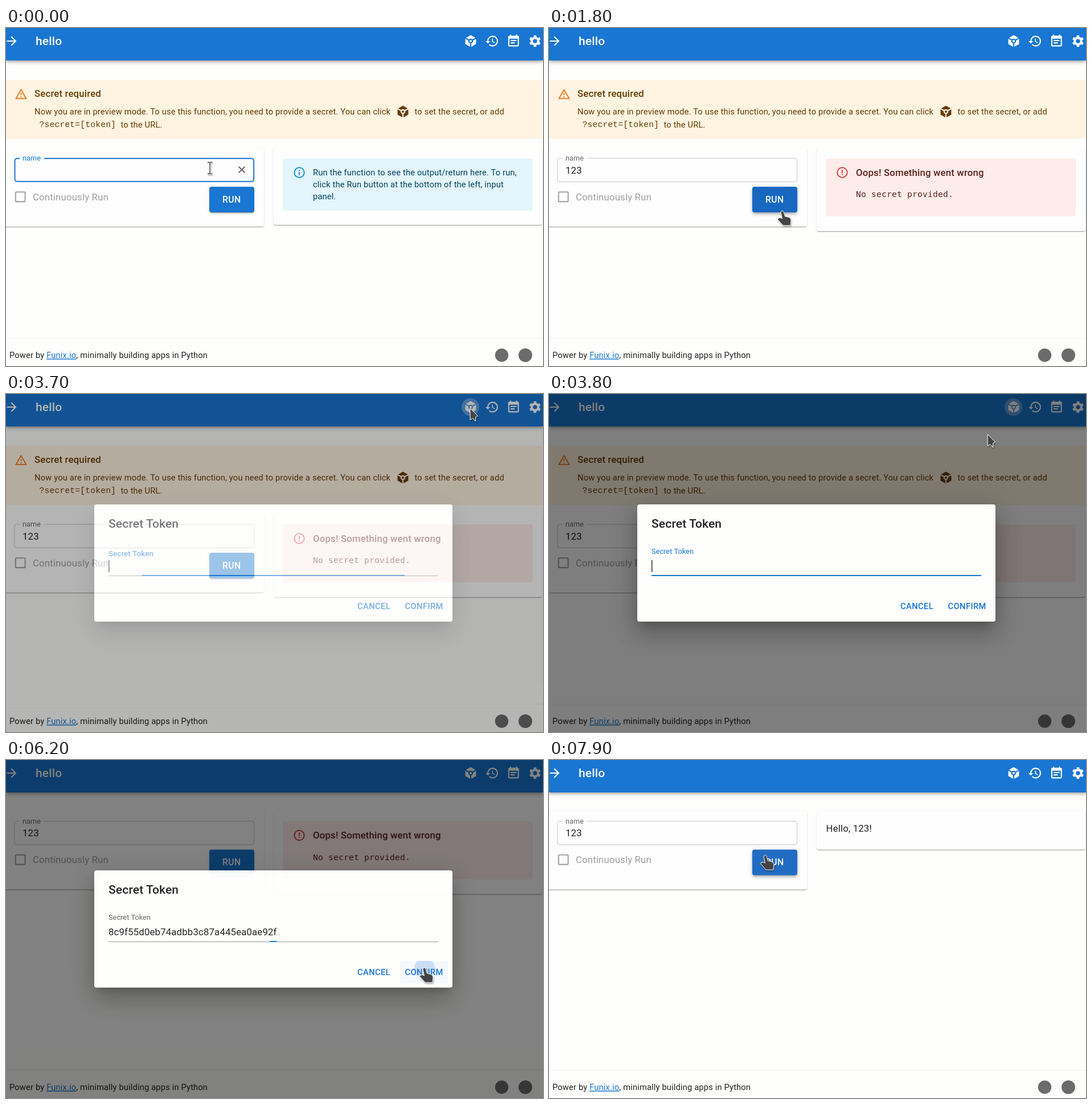
An HTML page that plays this animation: 943 by 594 pixels, repeating every 8000 ms.

```html
<!DOCTYPE html>
<html lang="en">
<head>
<meta charset="utf-8">
<title>hello</title>
<style>
  html, body { margin: 0; width: 100%; height: 100%; overflow: hidden; }
  #stage { position: relative; width: 943px; height: 594px; overflow: hidden; background: #fefefd; }
  #stage div, #stage svg { position: absolute; }
  .layer { left: 0; top: 0; width: 943px; height: 594px; overflow: visible; }
  .bar { left: 0; top: 0; width: 943px; height: 57px; background: #1976d2;
    box-shadow: 0 2px 4px -1px #0003, 0 4px 5px #00000024, 0 1px 10px #0000001f; }
  .alert { border-radius: 4px; }
  .card { top: 211px; background: #fefefe; border-radius: 4px;
    box-shadow: 0 2px 1px -1px #0003, 0 1px 1px #00000024, 0 1px 3px #0000001f; }
  #run { left: 357px; top: 279px; width: 79px; height: 44.5px; border-radius: 4px; overflow: hidden; }
  #confirm { left: 692px; top: 353px; width: 84px; height: 39px; border-radius: 4px; overflow: hidden; }
  .ripple { border-radius: 50%; }
  #dialog { left: 155px; top: 194px; width: 629px; height: 206px; background: #fefefd; border-radius: 4px;
    box-shadow: 0 11px 15px -7px #0003, 0 24px 38px 3px #00000024, 0 9px 46px 8px #0000001f; }
  text { font: 14.7px Roboto, sans-serif; letter-spacing: .0107em; fill: #212121; white-space: pre; }
  text.body { font-size: 16.8px; letter-spacing: .0094em; }
  text.title { font-size: 16.8px; font-weight: 500; letter-spacing: .0094em; }
  text.head { font-size: 21px; font-weight: 500; letter-spacing: .0075em; }
  text.label { font-size: 12.6px; letter-spacing: .0094em; }
  text.button { font-weight: 500; letter-spacing: .0286em; fill: #1976d2; }
  text.code { font-family: "Liberation Mono", monospace; }
  text.pre { font-family: "DejaVu Sans Mono", monospace; }
  .warn text { fill: #663c00; }
  .info text { fill: #014361; }
  .error text { fill: #5f2120; }
</style>
</head>
<body>
<div id="stage">
  <div id="warning" class="layer">
    <div class="alert" style="left:-4px;top:91px;width:946px;height:104px;background:#fff3e2"></div>
    <svg class="layer warn">
      <path transform="translate(14.9 104.6) scale(.963)" fill="#ed6c02" opacity=".9"
        d="M12 5.99L19.53 19H4.47L12 5.99M12 2L1 21h22L12 2zm1 14h-2v2h2v-2zm0-6h-2v4h2v-4z"/>
      <text class="title" x="50" y="121.3">Secret required</text>
      <text x="50" y="152">Now you are in preview mode. To use this function, you need to provide a secret. You can click</text>
      <use href="#cube" x="697" y="147" fill="#663c00"/>
      <text x="717.5" y="152">to set the secret, or add</text>
      <text class="code" x="58.5" y="173.5">?secret=[token]</text>
      <text x="201.5" y="175">to the URL.</text>
    </svg>
  </div>

  <div id="content" class="layer">
    <div class="card" style="left:-6px;width:459px;height:137.5px"></div>
    <div class="card" id="output" style="left:470px;width:472px"></div>
    <div class="alert" id="message" style="left:486px;top:229px;width:439px"></div>
    <div id="run"><div class="ripple" style="background:#fff"></div></div>
    <svg class="layer">
      <rect id="outline" rx="4" fill="none"/>
      <path d="M24 229h43" stroke="#fefefe" stroke-width="4"/>
      <text id="name" class="label" x="29" y="233">name</text>
      <text id="typed" class="body" x="29" y="255.8"></text>
      <path id="caret" stroke="#212121" stroke-width="1.2"/>
      <path id="clear" d="M408.5 243.5l11 11m0-11l-11 11" stroke="#666" stroke-width="1.8"/>
      <rect x="16.8" y="288.3" width="16.8" height="16.8" rx="1.2" fill="none" stroke="#a3a3a3" stroke-width="2.1"/>
      <text class="body" x="47" y="302.5" style="fill:#9e9e9e">Continuously Run</text>
      <text class="button" x="380" y="306.6" style="font-size:15.75px;fill:#fff">RUN</text>
      <g id="info" class="info">
        <g fill="none" stroke="#0288d1" stroke-width="2" opacity=".9">
          <circle cx="515" cy="254" r="8.7"/><path d="M515 249.2v2m0 1.8v5.8"/>
        </g>
        <text x="539" y="259">Run the function to see the output/return here. To run,</text>
        <text x="539" y="280">click the Run button at the bottom of the left, input</text>
        <text x="539" y="301">panel.</text>
      </g>
      <g id="error" class="error">
        <g fill="none" stroke="#d32f2f" stroke-width="2" opacity=".9">
          <circle cx="515" cy="254" r="8.7"/><path d="M515 249.2v5.8m0 1.8v2"/>
        </g>
        <text class="title" x="539" y="259.8">Oops! Something went wrong</text>
        <text class="pre" x="539" y="297">No secret provided.</text>
      </g>
      <text id="hello" class="body" x="486.5" y="247">Hello, 123!</text>
    </svg>
  </div>

  <div class="bar"></div>
  <svg class="layer">
    <defs>
      <g id="cube"><path transform="scale(1.05) translate(-12 -12)"
        d="M9.1 9.24C9.83 8.48 10.86 8 12 8s2.17.48 2.9 1.24l5.04-2.8L12 2 4.06 6.44zM11 15.87c-1.73-.44-3-2.01-3-3.87 0-.35.04-.69.13-1.01L3 8.14V17l8 4.44zm2 0v5.57L21 17V8.14l-5.13 2.85c.09.32.13.66.13 1.01 0 1.86-1.27 3.43-3 3.87zM10 12a2 2 0 1 0 4 0 2 2 0 1 0-4 0z"/></g>
    </defs>
    <text class="head" x="52" y="30" style="fill:#fff">hello</text>
    <circle id="glow" cx="815.5" cy="23" r="15.5" fill="#fff" opacity=".3"/>
    <g fill="#fff">
      <path transform="translate(-2.6 10.4) scale(1.05)" d="M12 4l-1.41 1.41L16.17 11H4v2h12.17l-5.58 5.59L12 20l8-8z"/>
      <use href="#cube" x="816" y="23"/>
      <path transform="translate(840.9 10.4) scale(1.05)" d="M13 3c-4.97 0-9 4.03-9 9H1l3.89 3.89.07.14L9 12H6c0-3.87 3.13-7 7-7s7 3.13 7 7-3.13 7-7 7c-1.93 0-3.68-.79-4.94-2.06l-1.42 1.42C8.27 19.99 10.51 21 13 21c4.97 0 9-4.03 9-9s-4.03-9-9-9zm-1 5v5l4.28 2.54.72-1.21-3.5-2.08V8H12z"/>
      <path transform="translate(878.7 10.4) scale(1.05)" d="M17 10H7v2h10v-2zm2-7h-1V1h-2v2H8V1H6v2H5c-1.11 0-1.99.9-1.99 2L3 19c0 1.1.89 2 2 2h14c1.1 0 2-.9 2-2V5c0-1.1-.9-2-2-2zm0 16H5V8h14v11zm-5-5H7v2h7v-2z"/>
    </g>
    <g transform="translate(929 23) rotate(75.5) scale(1.05)" fill="none" stroke="#fff">
      <circle r="5.5" stroke-width="3.9"/>
      <circle r="8.2" stroke-width="3" pathLength="12" stroke-dasharray="1 1"/>
    </g>
    <path d="M0 545h943" stroke="#f0f0f0"/>
    <text x="6" y="580">Power by <tspan fill="#1976d2" text-decoration="underline">Funix.io</tspan>, minimally building apps in Python</text>
    <g fill="#6b6b6b"><circle cx="870.5" cy="575" r="11.7"/><circle cx="912" cy="575" r="12"/></g>
  </svg>

  <div id="modal" class="layer">
    <div class="layer" style="background:#00000080"></div>
    <div id="dialog"></div>
    <div id="confirm"><div class="ripple" style="background:#1976d2"></div></div>
    <svg class="layer">
      <text class="head" x="180" y="234.5">Secret Token</text>
      <text id="tokenLabel" class="body" x="180">Secret Token</text>
      <text id="token" class="body" x="180" y="308">8c9f55d0eb74adbb3c87a445ea0ae92f</text>
      <path id="tokenCaret" stroke="#212121" stroke-width="1.4"/>
      <path d="M180 319.5h579" stroke="#949494"/>
      <path id="underline" stroke="#1976d2" stroke-width="2"/>
      <text class="button" x="617" y="378">CANCEL</text>
      <text class="button" x="700.5" y="378">CONFIRM</text>
    </svg>
  </div>

  <svg class="layer" style="filter:drop-shadow(1px 2px 1px #0005)">
    <g id="pointer" fill="#444" stroke="#fff" stroke-linejoin="round">
      <path id="arrow" d="M0 0V20.5L4.5 17.5L9.5 23V15.5L13.5 13.5Z"/>
      <path id="hand" d="M-3 2C-3-1 1-2 2 1L4.5 9L11 10.5Q15 12 15 16L14 25H1L-8.500 14.500Q-8 11-4 11.500L-.5 13Z"/>
      <g id="beam" fill="none">
        <path d="M-4-10h3l1 1 1-1h3M0-9V9M-4 10h3l1-1 1 1h3" stroke-width="3.2"/>
        <path d="M-4-10h3l1 1 1-1h3M0-9V9M-4 10h3l1-1 1 1h3" stroke="#444" stroke-width="1.4"/>
      </g>
    </g>
  </svg>
</div>

<script>
const LOOP = 8000, TICK = 100, BLUE = '#1976d2', GREY = '#666';
const OPEN = 3590, CONFIRM = 6100, CLOSE = 6180, COLLAPSE = 121.5;
const $ = id => document.getElementById(id);
const clamp = v => Math.max(0, Math.min(1, v));
const smooth = v => (v = clamp(v)) * v * (3 - 2 * v);
const mix = (a, b, p) => a + (b - a) * p;
const within = (t, a, b) => t >= a && t < b;
const show = (id, on) => $(id).style.display = on ? '' : 'none';
const attrs = (id, map) => { for (const k in map) $(id).setAttribute(k, map[k]); };

// time, x, y of the pointer's hot spot
const route = [
  [0, 358, 246], [600, 358, 246], [1100, 410, 322], [2100, 410, 322], [2500, 677, 271],
  [2600, 677, 271], [3100, 832, 45], [3400, 815, 25], [3700, 815, 25], [4300, 546, 300],
  [5400, 546, 300], [5900, 735, 366], [6700, 735, 366], [6800, 583, 298], [7200, 380, 168], [8000, 380, 168]
];

function pointerAt(t) {
  const i = route.findIndex(k => k[0] > t);
  const [t0, x0, y0] = route[i - 1], [t1, x1, y1] = route[i];
  const p = (t - t0) / (t1 - t0);
  return [mix(x0, x1, p), mix(y0, y1, p)];
}

function ripple(parent, age, x, y, strength, speed) {
  const style = $(parent).firstElementChild.style, r = 8 + age * speed;
  style.display = within(age, 0, 500) ? '' : 'none';
  style.left = x - r + 'px';
  style.top = y - r + 'px';
  style.width = style.height = 2 * r + 'px';
  style.opacity = strength * (1 - age / 500) ** 2;
}

function render(t) {
  const [x, y] = pointerAt(t);
  const shift = t > CONFIRM ? COLLAPSE : 0;
  const modal = within(t, 3600, 6500);
  const inBox = (l, top, r, b) => within(x, l, r) && within(y, top, b);
  const overRun = !modal && inBox(357, 279 - shift, 436, 323.5 - shift);
  const overConfirm = modal && t < 6300 && inBox(692, 353, 776, 392);
  const overCube = !modal && inBox(800, 8, 832, 39);
  const overInput = modal ? inBox(180, 285, 759, 320) : inBox(15, 229 - shift, 436, 271 - shift);

  // input panel
  const focused = t < 1300;
  const typed = t < 100 ? '' : t < 200 ? '12' : '123';
  show('warning', !shift);
  $('content').style.transform = `translateY(${-shift}px)`;
  $('typed').textContent = typed;
  attrs('outline', focused
    ? { x: 15.5, y: 229.3, width: 419.6, height: 40.5, stroke: BLUE, 'stroke-width': 2 }
    : { x: 14.9, y: 229, width: 420.7, height: 41.4, stroke: '#c4c4c4', 'stroke-width': 1 });
  $('name').style.fill = focused ? BLUE : GREY;
  attrs('caret', { d: `M${29.6 + typed.length * 9.75} 240v19` });
  show('caret', within(t, 100, 500));
  show('clear', focused);
  $('run').style.background = overRun ? '#1565c0' : BLUE;
  $('run').style.boxShadow = overRun
    ? '0 2px 4px -1px #0003, 0 4px 5px #00000024, 0 1px 10px #0000001f'
    : '0 3px 1px -2px #0003, 0 2px 2px #00000024, 0 1px 5px #0000001f';
  ripple('run', t - (t < 5000 ? 1400 : 7600), x - 357, y - 279 + shift, .3, .2);

  // output panel
  const state = t < 1500 ? 'info' : t < 7700 ? 'error' : 'hello';
  for (const id of ['info', 'error', 'hello']) show(id, id === state);
  $('output').style.height = { info: 135, error: 145.5, hello: 67.5 }[state] + 'px';
  show('message', state !== 'hello');
  $('message').style.height = state === 'info' ? '92px' : '102px';
  $('message').style.background = state === 'info' ? '#e4f5fc' : '#fdecea';
  show('glow', within(t, 3500, 3900));

  // dialog
  show('modal', modal);
  $('modal').style.opacity = smooth((t - OPEN) / 200) * (1 - smooth((t - CLOSE) / 250));
  const opening = 1 - (1 - clamp((t - OPEN) / 200)) ** 2;
  const line = t > CONFIRM ? (t < 6300 ? .021 : 0) : opening;
  attrs('underline', { d: `M${469.5 - 289.5 * line} 319h${579 * line}` });
  attrs('tokenLabel', { y: mix(308, 281.4, Math.min(1, opening * 1.1)) });
  $('tokenLabel').style.fontSize = mix(16.8, 12.6, opening) + 'px';
  $('tokenLabel').style.fill = t > CONFIRM ? GREY : BLUE;
  const pasted = t >= 5000;
  show('token', pasted);
  attrs('tokenCaret', { d: `M${pasted ? 476.3 : 180.8} 292v21` });
  show('tokenCaret', within(t, 3600, 3900) || within(t, 4300, 4900) || within(t, 5000, 5500));
  $('confirm').style.background = overConfirm ? '#1976d20a' : 'none';
  ripple('confirm', t - CONFIRM, x - 692, y - 353, .32, .1);

  // pointer
  const kind = overRun || overConfirm || overCube ? 'hand' : overInput ? 'beam' : 'arrow';
  for (const id of ['hand', 'beam', 'arrow']) show(id, id === kind);
  attrs('pointer', { transform: `translate(${x} ${y})` });
}

function frame() {
  render(Math.floor(performance.now() % LOOP / TICK) * TICK);
  requestAnimationFrame(frame);
}
frame();
</script>
</body>
</html>
```
